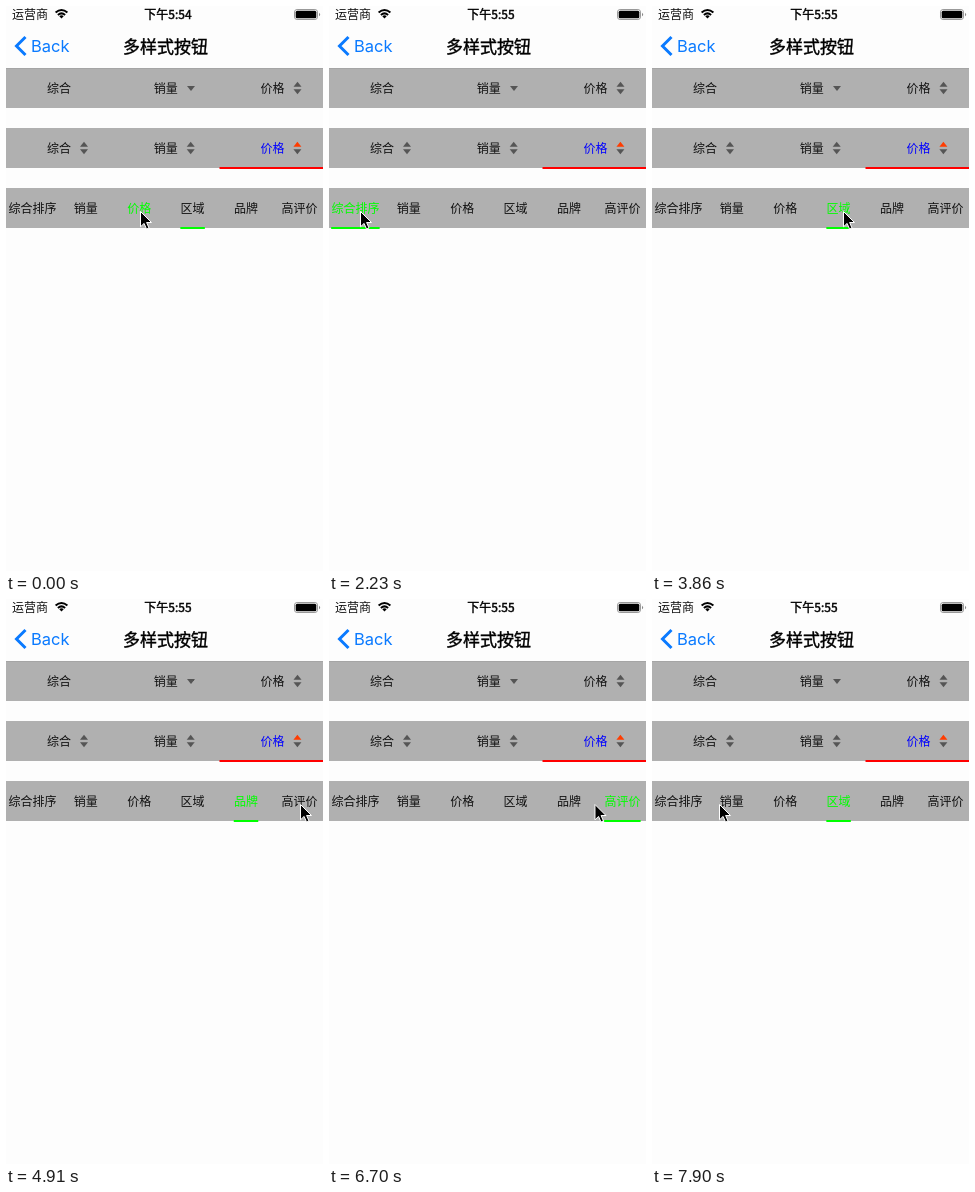
An HTML page that plays this animation: 317 px wide and 565 px high, repeating every 8000 ms.

```html
<!DOCTYPE html>
<html lang="zh">
<head>
<meta charset="utf-8">
<style>
html, body { margin: 0; width: 100%; height: 100%; overflow: hidden; background: #fdfdfd; }
svg { display: block; width: 317px; height: 565px; }
text { font: 12px "Noto Sans CJK SC", "Noto Sans CJK", sans-serif; text-anchor: middle; fill: #111; }
#clock, #title { fill: #000; stroke: #000; stroke-width: .4px; }
#title { font-size: 17px; }
#back { font: 16.5px Inter, sans-serif; fill: #0a7aff; text-anchor: start; }
</style>
</head>
<body>
<svg viewBox="0 0 317 565">
  <text x="24" y="12.5">运营商</text>
  <g fill="none" stroke="#000" stroke-width="2">
    <path d="M49.6 6.6Q55.5 1.4 61.4 6.6M51.9 9Q55.5 5.8 59.1 9"/>
    <path d="M53.3 10.2Q55.5 8.5 57.7 10.2L55.5 12.6Z" fill="#000" stroke="none"/>
  </g>
  <text id="clock" x="162" y="12.5"></text>
  <rect x="288.5" y="3.5" width="23" height="10" rx="2.6" fill="none" stroke="#999"/>
  <rect x="289.7" y="4.7" width="20.6" height="7.6" rx="1.5"/>
  <path d="M313 6.7Q315.4 8.5 313 10.3Z" fill="#888"/>
  <path d="M19.5 31L10.5 40L19.5 49" fill="none" stroke="#0a7aff" stroke-width="3"/>
  <text id="back" x="25" y="46">Back</text>
  <text id="title" x="159.5" y="46.5">多样式按钮</text>
  <g id="bars"></g>
  <rect y="62" width="317" height="1" fill="#a5a5a5"/>
  <rect x="213.5" y="161" width="103.5" height="2" fill="#f00"/>
  <rect id="line" y="221" height="2" fill="#0f0"/>
  <path id="cursor" d="M.5 .5V15.8L4.1 12.4L6.5 18L9 17L6.6 11.5H11.5Z" stroke="#fff"/>
</svg>
<script>
const $ = id => document.getElementById(id);

function add(tag, attrs, text = '') {
  const el = document.createElementNS('http://www.w3.org/2000/svg', tag);
  for (const k in attrs) el.setAttribute(k, attrs[k]);
  el.textContent = text;
  return $('bars').appendChild(el);
}
const label = (x, y, text, fill = '#111') => add('text', { x, y, style: `fill:${fill}` }, text);
const arrow = (x, y, h, fill = '#555') => add('path', { d: `M${x - 4} ${y}h8l-4 ${h}z`, fill });
function sorter(x, y, up) {
  arrow(x, y - 1.2, -5, up);
  arrow(x, y + 1.2, 5);
}

for (const y of [62, 122, 182]) add('rect', { y, width: 317, height: 40, fill: '#b0b0b0' });
['综合', '销量', '价格'].forEach((name, i) => {
  const x = 53 + i * 106.7, last = i == 2;
  label(x, 86.5, name);
  label(x, 146.5, name, last ? '#00f' : '#111');
  sorter(x + 25, 142, last ? '#ff3c00' : '#555');
});
arrow(185, 80, 5);
sorter(291.5, 82);

const COLUMN = 53.4;
const tabs = ['综合排序', '销量', '价格', '区域', '品牌', '高评价'].map((name, i) => {
  const x = 26.4 + i * COLUMN;
  return { x, width: name.length * 12 + 0.5, el: label(x, 206.5, name) };
});
const tabAt = x => tabs[Math.floor(x / COLUMN)];

// Each click: [screen tick, pointer x]; the column under the pointer gets selected
const TICK = 148.9;
const clicks = [[0, 134], [6, 81], [13, 31], [19, 130], [24, 191], [29, 230], [35, 294], [49, 184], [55, 67]];

const mix = (a, b, k) => a + (b - a) * k;
function ease(n, from, to) {
  const k = Math.min(1, Math.max(0, (n - from) / (to - from)));
  return k * k * (3 - 2 * k);
}

function draw(now) {
  const n = Math.floor((now % 8000 + 17) / TICK);
  const i = clicks.findLastIndex(c => c[0] <= n);
  const [start, x] = clicks[i], [next, nextX] = clicks[i + 1];

  const from = tabAt(clicks.at(i ? i - 1 : -2)[1]), to = tabAt(x);
  const slide = ease(n, start, start + 2);
  const width = mix(from.width, to.width, slide);
  $('line').setAttribute('x', mix(from.x, to.x, slide) - width / 2);
  $('line').setAttribute('width', width);
  for (const tab of tabs) tab.el.style.fill = tab == to ? '#0f0' : '#111';

  // The pointer waits for the underline, then arrives shortly before the next click
  const leave = Math.max(start + 2, next - 5);
  const move = ease(n, leave, Math.min(leave + 3, next - 2));
  $('cursor').setAttribute('transform', `translate(${mix(x, nextX, move)} 205)`);
  $('clock').textContent = n < 12 ? '下午5:54' : '下午5:55';
}

const begin = performance.now();
(function loop() {
  draw(performance.now() - begin);
  requestAnimationFrame(loop);
})();
</script>
</body>
</html>
```
